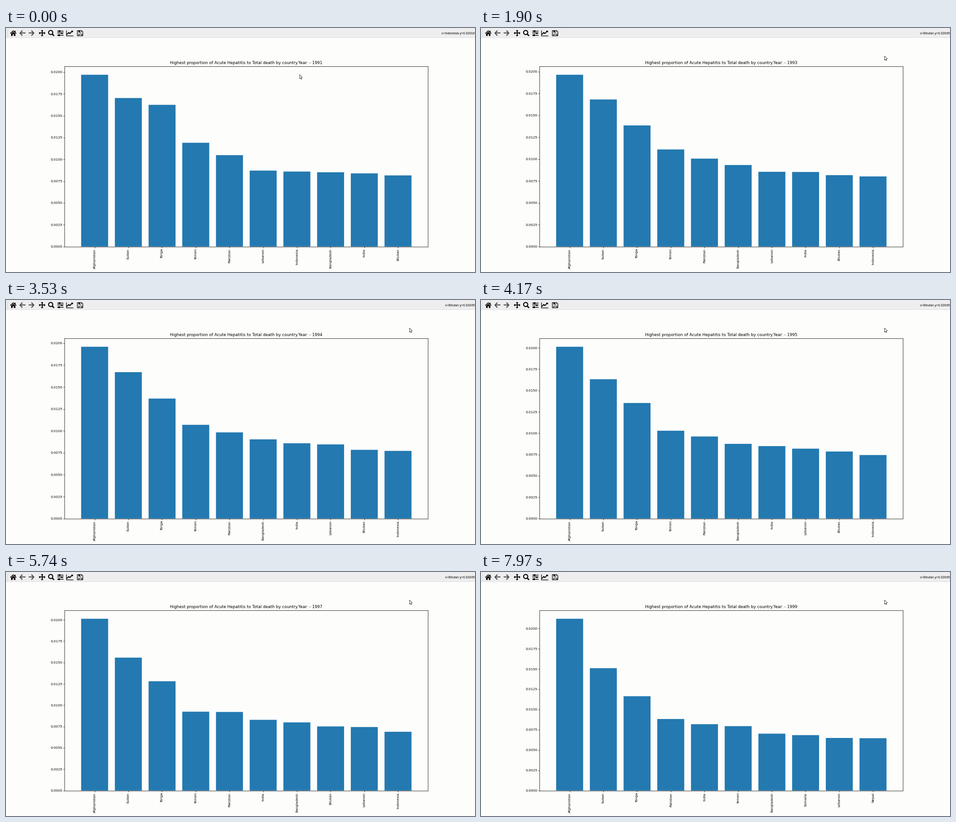
A matplotlib script for the animation above (8000 ms loop, 1035 px wide and 541 px high).

```python
import numpy as np
import matplotlib.pyplot as plt
from matplotlib.animation import FuncAnimation
from matplotlib.patches import Circle, Polygon, Rectangle

W, H, DPI = 1035, 541, 72      # at 72 dpi one point is one pixel
FPS, FRAMES = 30, 240
HOLD, LEAD = 30, 10            # frames per year, frames of the first year already gone
LEFT, TOP, AW, AH = 129.4, 84.6, 801.9, 400
BASE = TOP + AH
PT = 0.743                     # pixels per point of the plotted figure
PAPER, BLUE, GRAY = "#fdfdfc", "#2379b0", "#4f4f4f"

# Share of deaths (1e-4) at the turning points, straight lines between them.
TRENDS = {
    "Afghanistan": {91: 197, 94: 196, 96: 206.6, 98: 196, 99: 212},
    "Sudan": {91: 170.3, 94: 167, 98: 152, 99: 151},
    "Tonga": {91: 162.5, 92: 161.6, 93: 138.4, 96: 133.9, 99: 116.4},
    "Yemen": {91: 119, 96: 98.9, 99: 79.5},
    "Pakistan": {91: 104.8, 96: 94, 99: 88.3},
    "Lebanon": {91: 87.1, 94: 84.6, 96: 79.2, 99: 64.9},
    "Indonesia": {91: 86, 94: 77.2, 98: 66.1, 99: 60},
    "Bangladesh": {91: 85.2, 92: 96, 96: 84.7, 99: 70.2},
    "India": {91: 83.9, 94: 85.9, 98: 81.9},
    "Bhutan": {93: 81.6, 94: 78.4, 96: 78.7, 98: 71.6, 99: 60},
    "Somalia": {98: 50, 99: 68.4},
    "Nepal": {98: 50, 99: 64.6},
}

# Pointer path: time in seconds, x, y
PATH = [(-0.1, 642, 94.7), (0, 648, 103.3), (1.06, 760, 109.4),
        (1.16, 760, 109.4), (1.5, 868, 88.4), (1.6, 890.5, 62)]
LAG, REST = 0.1, 1.6

plt.rcParams["font.family"] = "DejaVu Sans"
fig = plt.figure(figsize=(W / DPI, H / DPI), dpi=DPI, facecolor=PAPER)

ax = fig.add_axes([LEFT / W, 1 - BASE / H, AW / W, AH / H], facecolor=PAPER)
bars = ax.bar(range(10), [1] * 10, color=BLUE, snap=False)
ax.set_xlim(-0.89, 9.89)
ax.set_xticks(range(10), [""] * 10, rotation=90)
ticks = np.arange(9) * 0.0025
ax.set_yticks(ticks, [f"{v:.4f}" for v in ticks])
ax.tick_params(labelsize=10 * PT, length=3.5 * PT, pad=3.5 * PT, width=0.75)
for spine in ax.spines.values():
    spine.set_linewidth(0.8)
title = ax.set_title("", fontsize=12 * PT, pad=6.5 * PT)

ui = fig.add_axes([0, 0, 1, 1], zorder=5)
ui.set(xlim=(0, W), ylim=(H, 0))
ui.axis("off")


def fill(pts, color="black", **kw):
    return ui.add_patch(Polygon(pts, fc=color, **{"lw": 0, **kw}))


def box(x, y, w, h, color="black"):
    ui.add_patch(Rectangle((x, y), w, h, fc=color, lw=0))


def stroke(pts, lw, color="black"):
    ui.plot(*zip(*pts), color=color, lw=lw, solid_capstyle="butt",
            solid_joinstyle="miter")


def home():
    stroke([(9.3, 12.2), (16, 6.2), (22.7, 12.2)], 1.6)
    fill([(11.3, 12.6), (16, 8.5), (20.7, 12.6), (20.7, 17.7), (17.3, 17.7),
          (17.3, 13.8), (14.7, 13.8), (14.7, 17.7), (11.3, 17.7)])
    box(19.2, 6.2, 1.7, 3.6)


def arrow(cx, way):
    tip = cx + 5.3 * way
    stroke([(cx - 6.2 * way, 11.3), (tip, 11.3)], 2.2, GRAY)
    stroke([(cx + 0.2 * way, 5.7), (tip, 11.3), (cx + 0.2 * way, 16.9)], 2.3, GRAY)


def move(cx, cy):
    for dx, dy in [(1, 0), (-1, 0), (0, 1), (0, -1)]:
        stroke([(cx, cy), (cx + 5 * dx, cy + 5 * dy)], 1.9)
        fill([(cx + 7.4 * dx, cy + 7.4 * dy),
              (cx + 4.3 * dx + 3 * dy, cy + 4.3 * dy + 3 * dx),
              (cx + 4.3 * dx - 3 * dy, cy + 4.3 * dy - 3 * dx)])


def lens():
    ui.add_patch(Circle((98.6, 10), 4.6, fc="none", ec="black", lw=2.1))
    stroke([(101.8, 13.2), (106, 17.4)], 2.7)


def sliders():
    for y, knob in [(6.7, 118), (11.4, 123), (16.1, 117)]:
        stroke([(113, y), (126.6, y)], 1.5)
        box(knob - 1.6, y - 1.9, 3.2, 3.8)


def chart():
    stroke([(132.6, 5), (132.6, 17.2), (148.3, 17.2)], 1.3)
    stroke([(134.4, 14.4), (138.5, 10), (141, 12.4), (146, 7.2)], 2)
    fill([(142.9, 5.5), (147.6, 5.5), (147.6, 10.2)])


def floppy():
    fill([(157.5, 5.7), (166.8, 5.7), (169.5, 8.4), (169.5, 17.3), (157.5, 17.3)],
         "none", ec="black", lw=1.3)
    box(159.6, 5.7, 6, 4)
    box(163.3, 6.4, 1.3, 2.5, "#eeeeee")
    stroke([(160, 17.3), (160, 13), (167, 13), (167, 17.3)], 1.2)


box(0, 0, W, 21.5, "#eeeeee")
box(0, 21, W, 0.7, "#e0e0e0")
for y in range(3, 20, 2):
    box(2.5, y, 1, 1, "#c4c4c4")
home()
arrow(36.3, -1)
arrow(56, 1)
move(79.6, 11.3)
lens()
sliders()
chart()
floppy()

message = ui.text(1034.3, 13.6, "", fontsize=7, family="Liberation Sans",
                  ha="right", va="baseline")
POINTER = np.array([(0, 0), (0, 9.2), (2, 7.4), (3.4, 10.4), (4.8, 9.8),
                    (3.5, 6.8), (6.1, 6.6)])
pointer = fill(POINTER, "white", ec="#222222", lw=0.8, joinstyle="miter")


def year_at(n):
    return 91 + (n + LEAD) // HOLD


def ranking(year):
    shares = {k: np.interp(year, list(v), list(v.values())) * 1e-4
              for k, v in TRENDS.items()}
    names = sorted(shares, key=shares.get, reverse=True)[:10]
    return names, [shares[k] for k in names]


def pointer_at(t):
    times, xs, ys = zip(*PATH)
    return np.interp(t, times, xs), np.interp(t, times, ys)


def readout(n):
    # The readout trails the pointer and freezes once it leaves the axes.
    n = min(n, int(REST * FPS))
    x, y = pointer_at(n / FPS - LAG)
    names, values = ranking(year_at(n))
    slot = int(round((x - LEFT) / AW * 10.78 - 0.89))
    value = (BASE - y) / AH * values[0] * 1.05
    return f"x={names[min(slot, 9)]} y={value:.5f}"


def draw(n):
    year = year_at(n)
    names, values = ranking(year)
    for bar, v in zip(bars, values):
        bar.set_height(v)
    ax.set_ylim(0, values[0] * 1.05)
    ax.set_xticklabels(names)
    title.set_text("Highest proportion of Acute Hepatitis to Total death "
                   f"by country.Year: - 19{year}")
    pointer.set_xy(POINTER + pointer_at(n / FPS))
    message.set_text(readout(n))
    return [*bars, title, pointer, message]


anim = FuncAnimation(fig, draw, frames=FRAMES, interval=1000 / FPS,
                     init_func=lambda: draw(0), repeat=True, repeat_delay=0,
                     blit=False)
plt.show()
```
